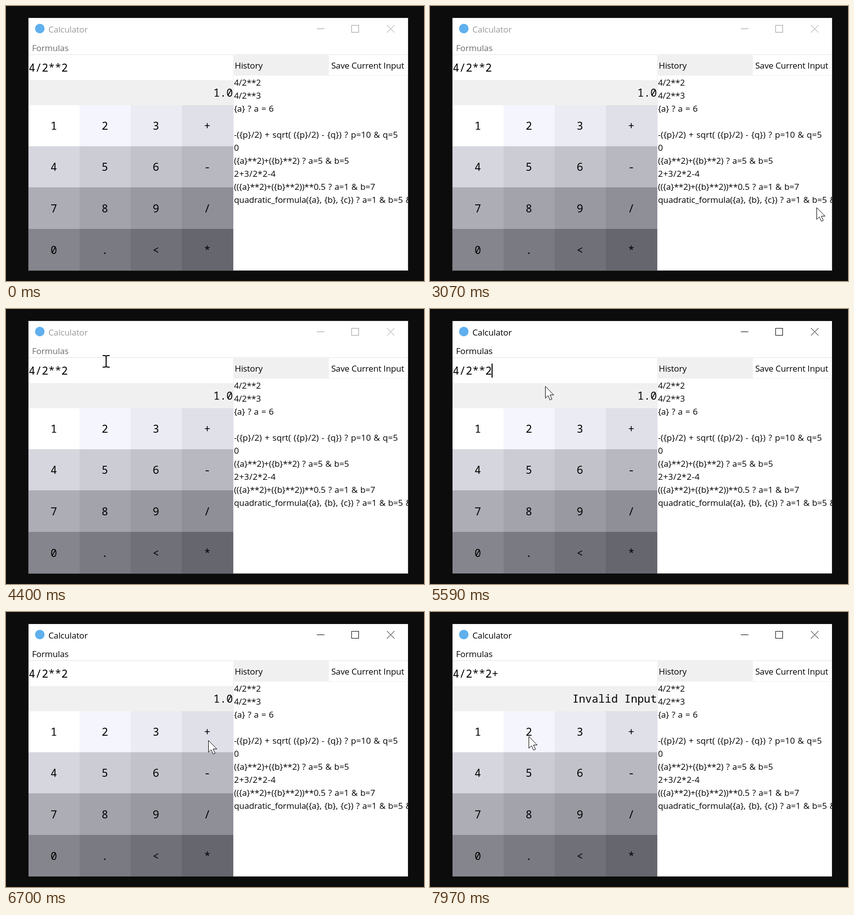
These frames come from a looping animation (835 px wide and 549 px high, 7990 ms). An HTML page:

```html
<!DOCTYPE html>
<html lang="en">
<head>
<meta charset="utf-8">
<title>Calculator</title>
<style>
  html, body { margin: 0; width: 100%; height: 100%; overflow: hidden; background: #0c0c0c; }
  svg { display: block; }
  text { font: 17px "Open Sans", "Noto Sans", sans-serif; white-space: pre; }
  .mono { font: 500 21.67px "Noto Sans Mono", "DejaVu Sans Mono", monospace; }
  .tight { letter-spacing: -.15px; }
  #history text { word-spacing: 1px; }
  .frame { fill: #fff; stroke: #111; }
  .icon { fill: none; stroke: #000; shape-rendering: crispEdges; }
  .inactive .frame { stroke: #333; }
  .inactive .icon { stroke: #999; }
  .inactive .title { fill: #999; }
  .inactive .menu { fill: #6d6d6d; }
</style>
</head>
<body>
<svg id="stage" width="835" height="549" viewBox="0 0 835 549">
  <g id="chrome">
    <rect class="frame" x="44.5" y="23.5" width="759" height="505"/>
    <circle cx="67.5" cy="45" r="9.5" fill="#5fb0ee"/>
    <text class="title tight" x="84.8" y="52.5">Calculator</text>
    <text class="menu tight" x="52" y="90">Formulas</text>
    <path class="icon" d="M621 45.5h15M690.5 38.5h14v14h-14z"/>
    <path class="icon" style="shape-rendering:auto" d="M761 38l15 15m0-15l-15 15"/>
  </g>
  <path fill="#f0f0f0" d="M45 96h758v2H45zM45 148h409v50H45zM454 97h191v41H454z"/>
  <rect x="454.5" y="138.5" width="348" height="389" fill="none" stroke="#f0f0f0"/>
  <text class="tight" x="457" y="125">History</text>
  <text class="tight" x="649.7" y="125">Save Current Input</text>
  <text id="input" class="mono" x="45.5" y="131"></text>
  <rect id="caret" x="123" y="109" width="2" height="28"/>
  <text id="result" class="mono" x="453.3" y="181" text-anchor="end"></text>
  <g id="keys"></g>
  <svg id="history" x="454" y="139" width="349" height="389"></svg>
  <g id="pointer">
    <path id="arrow" fill="#fff" stroke="#000" d="M.5.5v23.5l5.3-5.1 4 8.8 3.9-1.7-3.9-8.5h7.3z"/>
    <path id="beam" fill="none" stroke="#000" stroke-width="2" d="M-7-11h5l2 1.5 2-1.5h5M0-10v21M-7 12h5l2-1.5 2 1.5h5"/>
  </g>
</svg>
<script>
const LOOP = 7990, ACTIVE = 4830, PLUS = 7280;
const $ = id => document.getElementById(id);

function add(parent, tag, attrs, label = '') {
  const el = document.createElementNS('http://www.w3.org/2000/svg', tag);
  for (const name in attrs) el.setAttribute(name, attrs[name]);
  el.textContent = label;
  parent.append(el);
}

// Keypad: every key is one step darker than the one before it.
const colX = [45, 147, 249, 351, 454], rowY = [198, 280, 362, 445, 528];
[...'123+456-789/0.<*'].forEach((key, i) => {
  const c = i % 4, r = i >> 2, x = colX[c], y = rowY[r];
  const w = colX[c + 1] - x, h = rowY[r + 1] - y;
  const shade = Math.round(255 - 10.2 * i);
  add($('keys'), 'rect', {x, y, width: w, height: h, fill: `rgb(${shade},${shade},${Math.min(255, shade + 9)})`});
  add($('keys'), 'text', {class: 'mono', x: x + w / 2 - .5, y: y + h / 2 + 8, 'text-anchor': 'middle'}, key);
});

// Each history entry: text and optional letter spacing.
[
  ['4/2**2'], ['4/2**3'], ['{a} ? a = 6'], [''],
  ['-({p}/2) + sqrt( ({p}/2) - {q}) ? p=10 & q=5', .12], ['0'],
  ['({a}**2)+({b}**2) ? a=5 & b=5'], ['2+3/2*2-4', .45],
  ['(({a}**2)+({b}**2))**0.5 ? a=1 & b=7'],
  ['quadratic_formula({a}, {b}, {c}) ? a=1 & b=5 & c=3']
].forEach(([line, gap = -.1], i) =>
  add($('history'), 'text', {x: 1.5, y: 20 + 26 * i, 'letter-spacing': gap}, line));

// Pointer stops: time, x, y.
const path = [
  [820, 769, 542], [1060, 773, 403], [3070, 773, 403], [3510, 492, 132], [3850, 264, 61],
  [4400, 200, 104], [4620, 200, 114], [5330, 200, 114], [5590, 230, 154], [6050, 375, 326],
  [6290, 375, 326], [6700, 404, 256], [6820, 404, 257], [7520, 404, 257], [7970, 197, 248], [LOOP, 197, 248]
];
const caretOn = [[5330, 5670], [6290, 6590], [7050, 7520]];

function pointerAt(t) {
  const i = path.findIndex(p => p[0] > t);
  const [t0, x0, y0] = path[i - 1], [t1, x1, y1] = path[i];
  const k = (t - t0) / (t1 - t0);
  return [Math.round(x0 + (x1 - x0) * k), Math.round(y0 + (y1 - y0) * k)];
}

const show = (id, on) => $(id).setAttribute('visibility', on ? 'visible' : 'hidden');

function draw(t) {
  $('chrome').setAttribute('class', t < ACTIVE ? 'inactive' : '');
  $('input').textContent = t < PLUS ? '4/2**2' : '4/2**2+';
  $('result').textContent = t < PLUS ? '1.0' : 'Invalid Input';
  show('caret', caretOn.some(([from, to]) => t >= from && t < to));

  const visible = t >= path[0][0];
  const [x, y] = visible ? pointerAt(t) : [0, 0];
  const overInput = x < 454 && y >= 98 && y < 148;
  $('pointer').setAttribute('transform', `translate(${x} ${y})`);
  show('arrow', visible && !overInput);
  show('beam', visible && overInput);
}

const start = performance.now();
function tick() {
  draw((performance.now() - start) % LOOP);
  requestAnimationFrame(tick);
}
tick();
</script>
</body>
</html>
```
